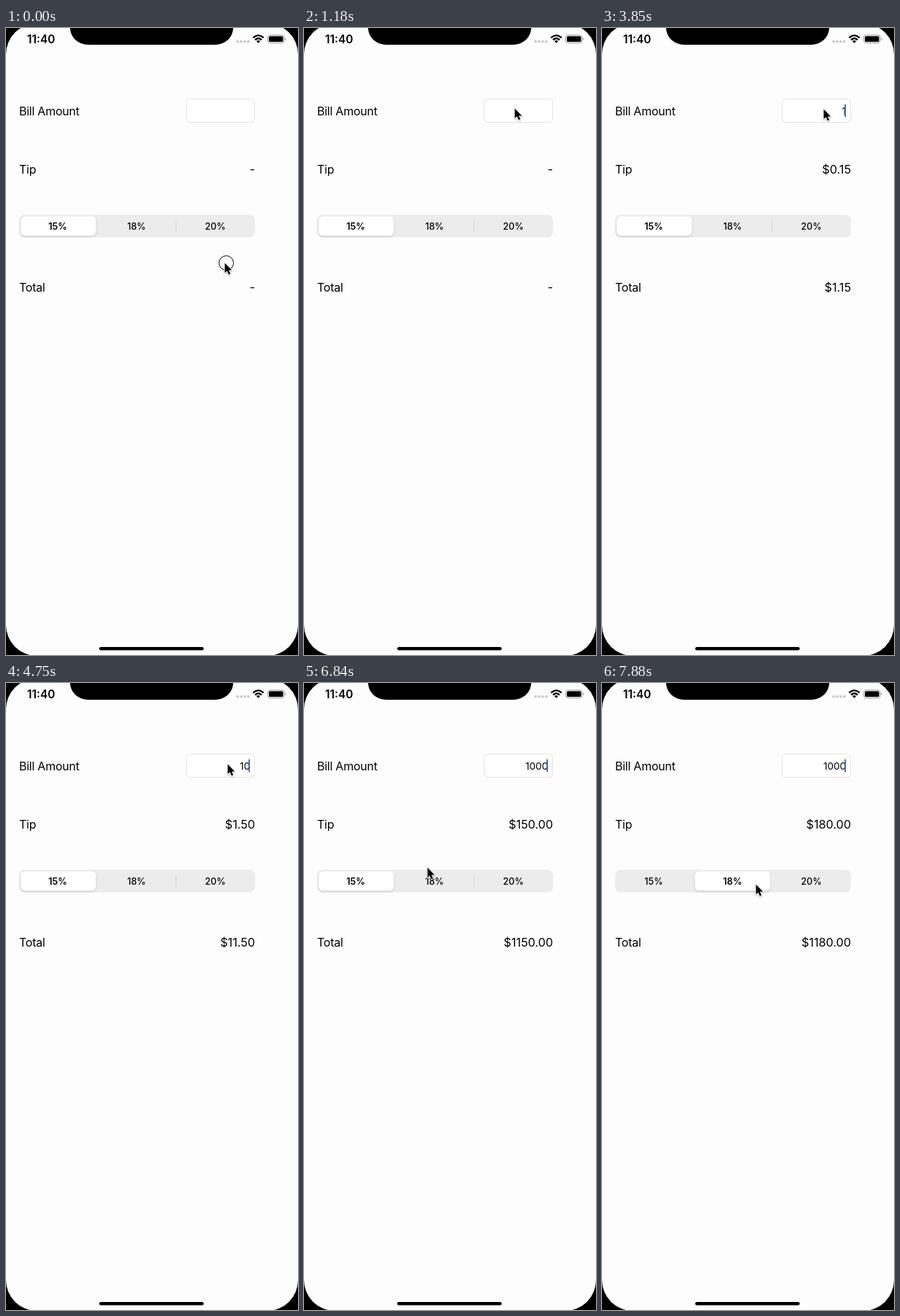
Animation, 401 px wide and 861 px high, one loop 8000 ms. Source, as an HTML page:

```html
<!DOCTYPE html>
<html lang="en">
<head>
<meta charset="utf-8">
<title>Tip calculator</title>
<style>
  html, body { margin: 0; width: 100%; height: 100%; overflow: hidden; background: #000; }
  svg { display: block; width: 401px; height: 861px; }
  text { font-family: Inter, Roboto, sans-serif; fill: #000; }
  .label { font-size: 16px; letter-spacing: -.25px; }
  .amount { font-size: 16.2px; text-anchor: end; }
  .time { font-size: 15.4px; font-weight: 600; }
  .bill { font-size: 13.5px; text-anchor: end; }
  .segment { font-size: 12.6px; font-weight: 500; text-anchor: middle; }
  .segment.on { font-weight: 600; }
  #thumb { filter: drop-shadow(0 1.5px 1px rgba(0, 0, 0, .2)); }
  #arrow { filter: drop-shadow(0 1px 1px rgba(0, 0, 0, .3)); }
</style>
</head>
<body>
<svg viewBox="0 0 401 861">
  <rect width="401" height="861"/>
  <rect y="-6" width="401" height="868" rx="42" fill="#fdfdfd"/>
  <path d="M88 0A25 23 0 0 0 113 23H287A25 23 0 0 0 312 0Z"/>

  <text class="time" x="29" y="20.5">11:40</text>
  <path d="M318 18.6H333" stroke="#c9c9c9" stroke-width="3.8" stroke-linecap="round" stroke-dasharray="0 4.9"/>
  <g fill="none" stroke="#000" stroke-width="2.3">
    <path d="M339.3 13.4Q346.5 6.9 353.7 13.4"/>
    <path d="M342 16.3Q346.5 12.2 351 16.3"/>
  </g>
  <path d="M343.9 18Q346.5 15.9 349.1 18L346.5 20.7Z"/>
  <rect x="359.5" y="9.8" width="22.5" height="10.7" rx="3" fill="none" stroke="#999"/>
  <rect x="361" y="11.3" width="19.5" height="7.7" rx="1.6"/>
  <path d="M383.3 13.3Q385.8 15.1 383.3 17Z" fill="#999"/>

  <text class="label" x="18" y="120">Bill Amount</text>
  <text class="label" x="18" y="200">Tip</text>
  <text class="label" x="18" y="362">Total</text>

  <rect x="247.5" y="97.5" width="94" height="32" rx="5" fill="#fff" stroke="#e3e3e3"/>
  <text class="bill" id="bill" x="335" y="118.5"></text>
  <rect id="caret" x="333" y="104.5" width="2" height="18" rx="1" fill="#4169e1"/>

  <text class="amount" id="tip" x="342" y="200"></text>
  <text class="amount" id="total" x="342" y="362"></text>

  <rect x="18" y="256.5" width="324" height="31" rx="7.5" fill="#ececec"/>
  <path id="divider" d="M233.5 264V280.5" stroke="#d6d6d6"/>
  <rect id="thumb" x="20" y="258.5" width="103.5" height="27" rx="6" fill="#fff"/>
  <text class="segment" x="71" y="276.5">15%</text>
  <text class="segment" x="179.3" y="276.5">18%</text>
  <text class="segment" x="287.5" y="276.5">20%</text>

  <rect x="128" y="850" width="143.5" height="4.6" rx="2.3"/>

  <g id="pointer">
    <circle id="ring" cx="2" r="10" fill="none" stroke="#000"/>
    <path id="arrow" d="M0 0V13.6L3.1 10.8L5.3 15.8L7.6 14.8L5.4 9.9H9.7Z"
      stroke="#fff" stroke-width="1.6" paint-order="stroke"/>
  </g>
</svg>
<script>
  // The screen refreshes in coarse ticks; every time below counts ticks.
  const TICK = 148.5, LEAD = 18, LOOP = 8000;
  const FOCUS = 15, PICK = 51;
  const clicks = [0, 10, 50];
  const keys = [23, 32, 35, 40];
  const amount = '1000';
  const rates = [.15, .18, .2];

  const rest = [300.5, 322.7], field = [289.5, 110.5];
  const typing = [304.5, 111.5], option = [211.5, 276.7];
  const moves = [
    { start: 2, ticks: 6, from: rest, bend: [375, -90], to: field },
    { start: 13, ticks: 2, from: field, bend: [297, 111], to: typing },
    { start: 42, ticks: 6, from: typing, bend: [94, 266], to: option }
  ];

  const byId = id => document.getElementById(id);
  const segments = [...document.querySelectorAll('.segment')];
  const clamp = u => Math.min(1, Math.max(0, u));
  const smooth = u => u * u * (3 - 2 * u);
  const money = n => '$' + n.toFixed(2);

  function pointerAt(k) {
    const { start, ticks, from, bend, to } = moves.findLast(m => m.start <= k) || moves[0];
    const u = clamp((k - start) / ticks), v = 1 - u;
    return from.map((p, i) => v * v * p + 2 * u * v * bend[i] + u * u * to[i]);
  }

  // The caret blinks on a seven-tick cycle that restarts with each key.
  function caretOn(k) {
    const reset = [FOCUS, ...keys].findLast(r => r <= k);
    const phase = (k - reset) % 7;
    return k >= FOCUS && phase !== 4 && phase !== 5;
  }

  function draw(k) {
    const bill = amount.slice(0, keys.filter(key => key <= k).length);
    const choice = k < PICK ? 0 : 1;
    const slide = smooth(clamp((k - PICK + 1) / 3));
    const tip = bill * rates[choice];

    byId('bill').textContent = bill;
    byId('tip').textContent = bill ? money(tip) : '-';
    byId('total').textContent = bill ? money(+bill + tip) : '-';

    byId('caret').style.opacity = +caretOn(k);
    byId('ring').style.opacity = +clicks.includes(k);
    byId('thumb').setAttribute('x', 20 + 107.5 * slide);
    byId('divider').style.opacity = 1 - slide;
    segments.forEach((s, i) => s.classList.toggle('on', i === choice));
    byId('pointer').setAttribute('transform', `translate(${pointerAt(k)})`);
  }

  const begin = performance.now();
  let shown = -1;
  function refresh() {
    const t = (performance.now() - begin) % LOOP;
    const k = Math.min(53, Math.floor((t + LEAD) / TICK));
    if (k !== shown) draw(shown = k);
    requestAnimationFrame(refresh);
  }
  refresh();
</script>
</body>
</html>
```
